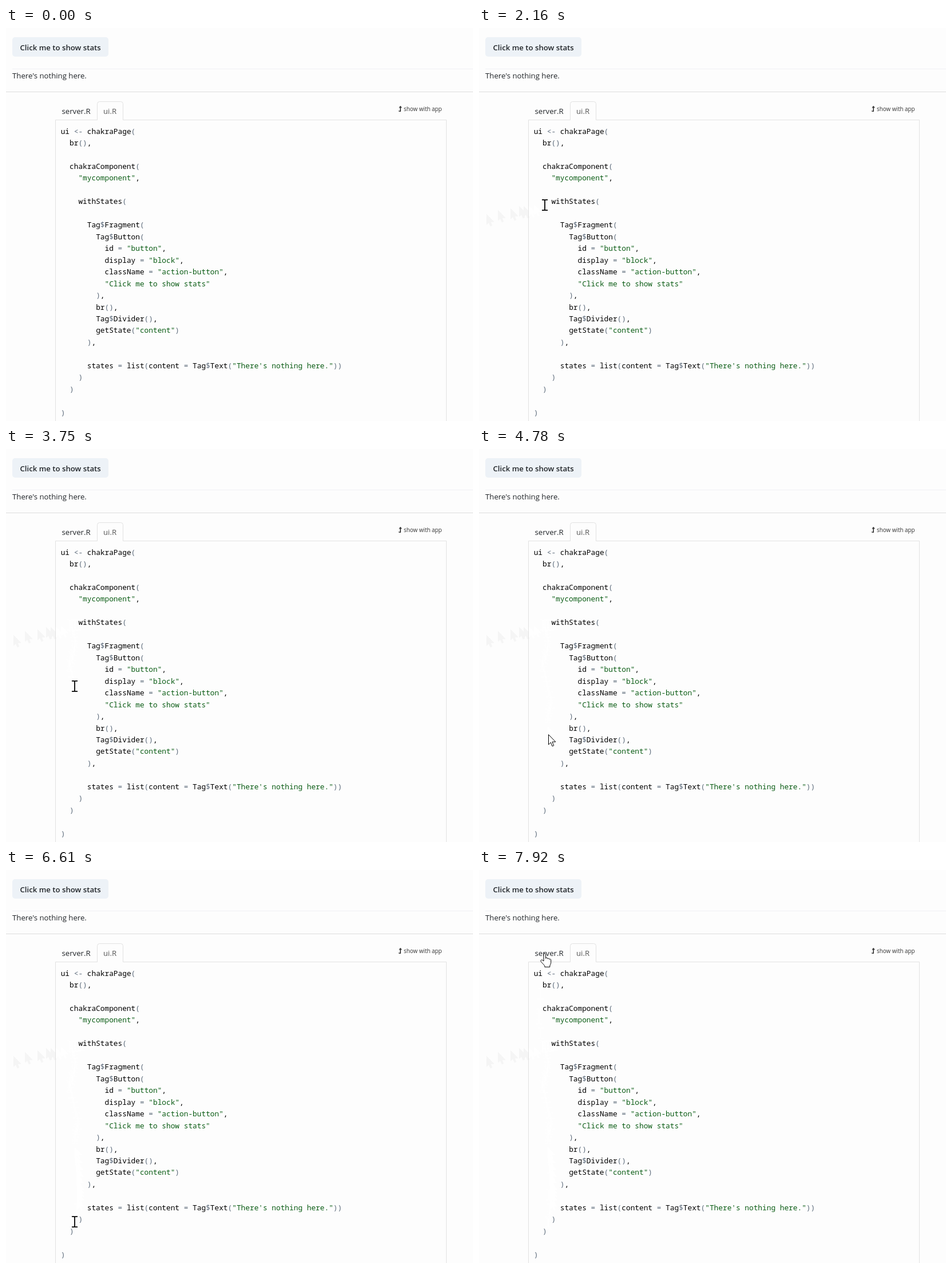
These frames come from a looping animation (816 by 686 pixels, 7990 ms). An HTML page:

```html
<!DOCTYPE html>
<html lang="en">
<head>
<meta charset="utf-8">
<title>Component states</title>
<style>
html, body { margin: 0; width: 100%; height: 100%; overflow: hidden; background: #fdfdfd; }
svg { display: block; }
text { font-family: "Open Sans", "Noto Sans", sans-serif; font-size: 13.2px; fill: #212529; white-space: pre; }
.code text { font-family: "Noto Sans Mono", "DejaVu Sans Mono", monospace; font-size: 12.8px; fill: #000; }
.code .op { fill: #5c6a7a; }
.code .str { fill: #0a5c14; }
.line { fill: none; stroke: #e2e2e2; }
</style>
</head>
<body>
<svg width="816" height="686" viewBox="0 0 816 686">
  <defs>
    <path id="arrow" d="M.5 .5V18L4.4 14.2L7 20.8L9.7 19.7L7 13.2H12.8Z"/>
    <path id="beam" d="M-5 -9.2H-2Q0 -9.2 0 -8Q0 -9.2 2 -9.2H5M0 -8V8.5M-5 9.2H-2Q0 9.2 0 8Q0 9.2 2 9.2H5"/>
    <path id="hand" d="M6 14V2.3a1.8 1.8 0 0 1 3.6 0V9.3a1.7 1.7 0 0 1 3.3 .2V10.2a1.6 1.6 0 0 1 3 .3V11.2a1.5 1.5 0 0 1 2.8 .6V16.5C18.7 19 17.2 20.5 16.8 22V24.3H7.8V22.4C6.4 20 3 17.5 1.2 14.6C0 12.5 2.4 11 4 12.4Z"/>
  </defs>
  <rect width="816" height="686" fill="#fdfdfd"/>
  <g id="ghosts"></g>
  <rect x="11" y="16" width="168" height="34" rx="5" fill="#edf2f7"/>
  <text x="24.5" y="39" font-weight="600" fill="#1a202c">Click me to show stats</text>
  <path class="line" d="M11 71.5H816" style="stroke:#eff1f4"/>
  <text x="11" y="88">There's nothing here.</text>
  <path class="line" d="M0 111.5H816" style="stroke:#dcdcdc"/>
  <path class="line" d="M86.5 686V160.5H159.5V132.5q0 -4 4 -4H200.5q4 0 4 4V160.5H769.5V686"/>
  <text x="97.5" y="150">server.R</text>
  <text x="170" y="150" style="fill:#555">ui.R</text>
  <path d="M689.2 135.8L692 139.2H690V146H686.8L685.5 144.6H688.4V139.2H686.4Z" fill="#333"/>
  <text x="695" y="145" style="font-size:9.9px;fill:#333">show with app</text>
  <g id="code" class="code"></g>
  <g id="pointer"></g>
</svg>
<script>
const LOOP = 7990, STEP = 70, COL = 7.68, ROW = 20.46;
const SVG = "http://www.w3.org/2000/svg";
const byId = id => document.getElementById(id);

function add(parent, tag, attrs = {}, content = "") {
  const el = document.createElementNS(SVG, tag);
  for (const key in attrs) el.setAttribute(key, attrs[key]);
  el.textContent = content;
  return parent.appendChild(el);
}

const source = `ui <- chakraPage(
  br(),

  chakraComponent(
    "mycomponent",

    withStates(

      Tag$Fragment(
        Tag$Button(
          id = "button",
          display = "block",
          className = "action-button",
          "Click me to show stats"
        ),
        br(),
        Tag$Divider(),
        getState("content")
      ),

      states = list(content = Tag$Text("There's nothing here."))
    )
  )

)`;

source.split("\n").forEach((line, row) => {
  const body = line.trimStart();
  const text = add(byId("code"), "text", {
    x: 95.7 + (line.length - body.length) * COL,
    y: Math.round(184.6 + row * ROW)
  });
  for (const token of body.match(/"[^"]*"|<-|[=$()]|[^"<=$()]+/g) || []) {
    const kind = token[0] === '"' ? "str" : /^[<=$()]/.test(token) ? "op" : "id";
    add(text, "tspan", { class: kind }, token);
  }
});

// Each move: start time, then waypoints of step, x, y, pointer shape.
const moves = [
  [730, [0, 13, 325, "arrow"], [1, 33, 318, "arrow"], [2, 55, 315, "arrow"], [3, 70, 311, "arrow"],
    [4, 78, 311, "arrow"], [6, 96, 308, "arrow"], [7, 112, 307, "beam"], [9, 131, 306, "beam"],
    [10, 133, 306, "beam"], [11, 126, 307, "beam"]],
  [1830, [0, 120, 308, "beam"], [1, 115, 308, "beam"]],
  [2160, [0, 115, 309, "beam"], [5, 121, 337, "beam"], [9, 116, 367, "beam"], [11, 113, 363, "beam"]],
  [3000, [0, 111, 371, "beam"], [1, 110, 377, "beam"]],
  [3470, [0, 112, 380, "beam"], [4, 120, 414, "beam"], [7, 127, 443, "beam"], [11, 120, 462, "beam"]],
  [4310, [0, 120, 464, "beam"]],
  [4640, [0, 120, 469, "beam"], [1, 120, 484, "arrow"], [2, 121, 498, "arrow"],
    [6, 124, 545, "arrow"], [9, 124, 563, "arrow"]],
  [5600, [0, 124, 574, "arrow"], [1, 124, 592, "beam"], [3, 122, 618, "beam"], [4, 121, 616, "beam"]],
  [6610, [0, 120, 614, "beam"], [2, 124, 520, "beam"], [5, 111, 310, "beam"], [7, 105, 260, "beam"]],
  [7500, [0, 105, 252, "beam"], [3, 110, 198, "beam"], [4, 112, 176, "arrow"],
    [5, 112, 162, "arrow"], [6, 107, 145, "hand"]]
];

const samples = moves.flatMap(([start, ...points]) => {
  const list = [];
  points.forEach(([step, x, y, shape], i) => {
    const [nextStep, nextX, nextY] = points[i + 1] || [step + 1, x, y];
    for (let s = step; s < nextStep; s++) {
      const k = (s - step) / (nextStep - step);
      list.push({ t: start + s * STEP, x: x + (nextX - x) * k, y: y + (nextY - y) * k, shape });
    }
  });
  return list;
});

const place = ({ x, y, shape }) => ({ href: "#" + shape, transform: `translate(${Math.round(x)} ${Math.round(y)})` });

// Faint marks stay behind wherever the pointer has been.
const ghosts = samples.map(s => {
  const color = s.x < 80 ? "#f5f5f5" : "#fff";
  return add(byId("ghosts"), "use", { ...place(s), fill: color, stroke: color });
});

const pointer = byId("pointer");
const halo = add(pointer, "use", { fill: "none", stroke: "#fff", "stroke-width": 3.4 });
const shape = add(pointer, "use", { stroke: "#000" });

function render(time) {
  let current = -1;
  while (current + 1 < samples.length && samples[current + 1].t <= time) current++;
  ghosts.forEach((g, i) => g.setAttribute("visibility", i < current ? "visible" : "hidden"));
  pointer.setAttribute("visibility", current < 0 ? "hidden" : "visible");
  if (current < 0) return;
  const sample = samples[current], isBeam = sample.shape === "beam";
  for (const el of [halo, shape])
    for (const [key, value] of Object.entries(place(sample))) el.setAttribute(key, value);
  halo.setAttribute("stroke-opacity", isBeam ? 1 : 0);
  shape.setAttribute("fill", isBeam ? "none" : "#fff");
  shape.setAttribute("stroke-width", isBeam ? 1.8 : 1);
}

function tick() {
  render(performance.now() % LOOP);
  requestAnimationFrame(tick);
}
tick();
</script>
</body>
</html>
```
